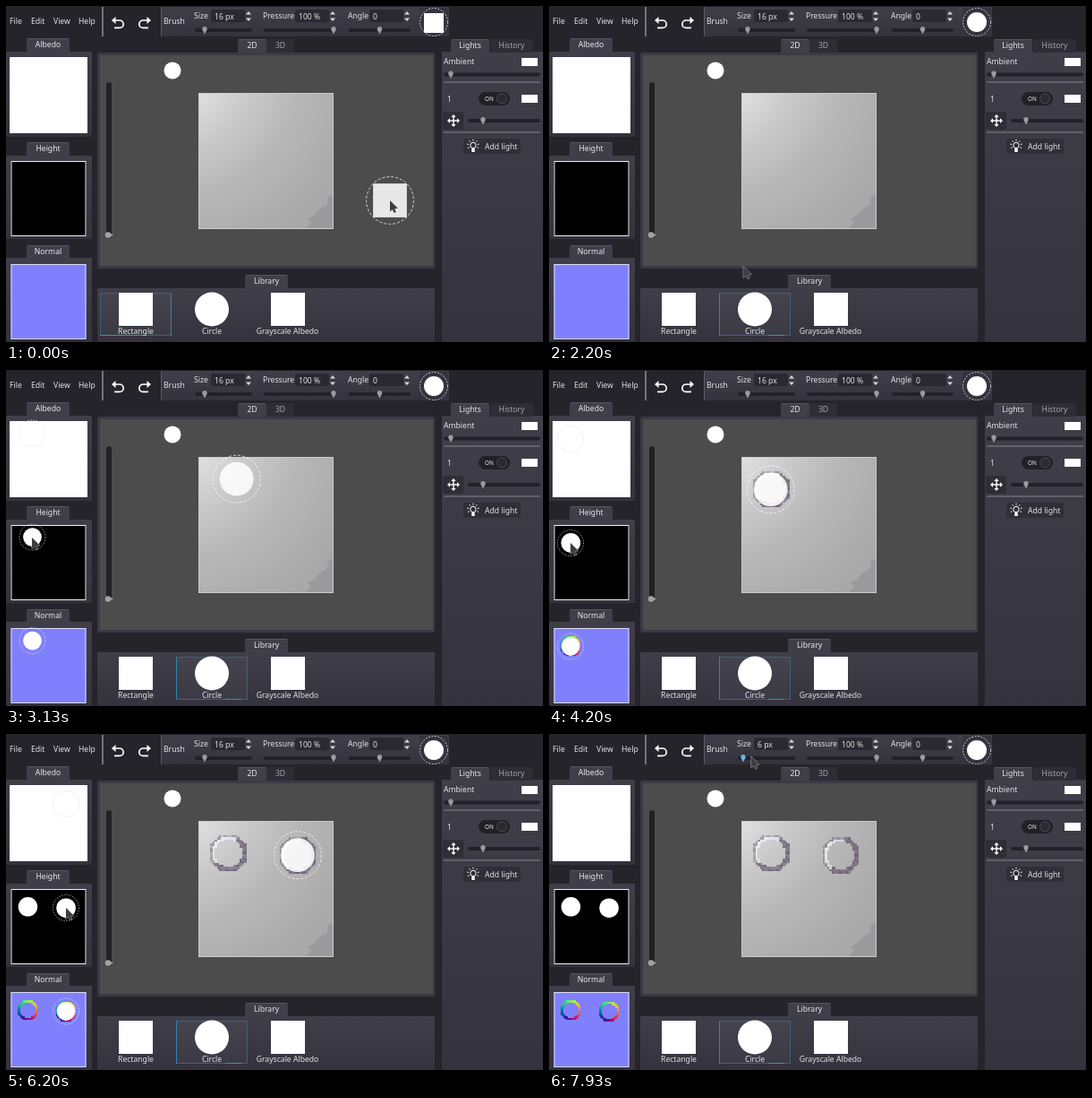
Animation, 600 px wide and 375 px high, one loop 8000 ms. Source, as an HTML page with a canvas:

```html
<!DOCTYPE html>
<html>
<head>
<meta charset="utf-8">
<style>
html, body { margin: 0; width: 100%; height: 100%; overflow: hidden; background: #25242b; }
canvas { display: block; }
</style>
</head>
<body>
<canvas id="stage" width="600" height="375"></canvas>
<script>
const g = document.getElementById('stage').getContext('2d');
const LOOP = 8000, TICK = 1000 / 15, TEXELS = 64;
const PICK = 1500, STAMP_1 = 3850, STAMP_2 = 5930, HOVER = 7060, DRAG = 7500, DRAG_END = 7900;
const LAMP = { x: 186, y: 72 };

// cursor path: time, x, y
const path = [
  [0, 429, 217], [870, 229, 349], [1200, 221, 345], [2000, 221, 345], [2530, 209, 175],
  [2600, 165, 138], [2870, 32, 184], [3130, 29, 187], [3730, 24, 193], [4200, 24, 193],
  [4930, 59, 193], [5130, 59, 193], [5800, 67, 194], [6750, 67, 194], [7070, 229, 27],
  [7330, 231, 25], [DRAG, 231, 25], [DRAG_END, 226, 25], [LOOP, 226, 25]
];

// the four places that show the texture: origin, scale, visible area
const small = 83 / TEXELS;
const maps = [
  { kind: 'lit', x: 215, y: 97, k: 151 / TEXELS, area: [105, 55, 372, 235] },
  { kind: 'albedo', x: 6, y: 57, k: small, area: [2, 53, 92, 92] },
  { kind: 'height', x: 6, y: 173, k: small, area: [2, 169, 92, 91] },
  { kind: 'normal', x: 6, y: 288.5, k: small, area: [2, 284, 92, 91] }
];

function rect(color, x, y, w, h) {
  g.fillStyle = color;
  g.fillRect(x, y, w, h);
}
function frame(color, x, y, w, h) {
  g.strokeStyle = color;
  g.lineWidth = 1;
  g.strokeRect(x + .5, y + .5, w - 1, h - 1);
}
function round(color, x, y, w, h, r) {
  g.fillStyle = color;
  g.beginPath();
  g.roundRect(x, y, w, h, r);
  g.fill();
}
function disc(color, x, y, r) {
  g.fillStyle = color;
  g.beginPath();
  g.arc(x, y, r, 0, 7);
  g.fill();
}
function ring(color, x, y, r, dash) {
  g.strokeStyle = color;
  g.lineWidth = 1;
  g.setLineDash(dash);
  g.beginPath();
  g.arc(x, y, r, 0, 2 * Math.PI);
  g.stroke();
  g.setLineDash([]);
}
function poly(color, ...p) {
  g.fillStyle = color;
  g.beginPath();
  for (let i = 0; i < p.length; i += 2) g.lineTo(p[i], p[i + 1]);
  g.closePath();
  g.fill();
}
function text(s, x, middle, align = 'left', color = '#e2e2e4', size = 8.6) {
  g.font = size + 'px "Noto Sans", "Open Sans", sans-serif';
  g.textAlign = align;
  g.fillStyle = color;
  g.fillText(s, x, middle + size * .36);
}
function panel(x, y, w, h) {
  const fill = g.createLinearGradient(0, y, 0, y + h);
  fill.addColorStop(0, '#403e49');
  fill.addColorStop(1, '#34323c');
  round(fill, x, y, w, h, 1);
}
function tab(label, x, y, w, active = true) {
  round(active ? '#403e49' : '#2e2c35', x, y, w, 15, [2, 2, 0, 0]);
  if (active) rect('#56545f', x + 1, y, w - 2, 1);
  text(label, x + w / 2, y + 7, 'center', active ? '#e8e8ea' : '#a5a4aa');
}
function slider(x0, x1, y, knob, color = '#9b9aa2') {
  round('#222028', x0, y - 2, x1 - x0, 4, 2);
  disc(color, knob, y - 1.2, 2.7);
  poly(color, knob - 2.3, y, knob + 2.3, y, knob, y + 4.5);
}
function spinBox(label, x, value, boxX) {
  text(label, x, 11);
  round('#2a2831', boxX, 4, 38, 14, 2);
  text(value, boxX + 4, 11.5);
  const a = boxX + 42;
  poly('#d8d8da', a - 3, 9.5, a, 6, a + 3, 9.5);
  poly('#d8d8da', a - 3, 13.5, a, 17, a + 3, 13.5);
}
function historyArrow(x, dir) {
  g.save();
  g.translate(x, 19);
  g.scale(dir, 1);
  g.strokeStyle = '#fff';
  g.lineWidth = 1.7;
  g.beginPath();
  g.moveTo(-4, -3);
  g.lineTo(2, -3);
  g.arc(2, 1.2, 4.2, -Math.PI / 2, Math.PI / 2);
  g.lineTo(-4, 5.4);
  g.stroke();
  poly('#fff', -7, -3, -2.5, -7, -2.5, 1);
  g.restore();
}
function moveIcon(x, y) {
  rect('#fff', x - 5, y - .7, 10, 1.4);
  rect('#fff', x - .7, y - 5, 1.4, 10);
  for (const [a, b] of [[1, 0], [-1, 0], [0, 1], [0, -1]])
    poly('#fff', x + a * 7, y + b * 7, x + a * 4 + b * 2.7, y + b * 4 + a * 2.7,
      x + a * 4 - b * 2.7, y + b * 4 - a * 2.7);
}
function bulbIcon(x, y) {
  ring('#fff', x, y - 1, 3.2, []);
  rect('#fff', x - 1.7, y + 2.5, 3.4, 4);
  g.beginPath();
  for (let i = 0; i < 7; i++) {
    const a = Math.PI * (1 - .15 + i * 1.3 / 6), c = Math.cos(a), s = Math.sin(a);
    g.moveTo(x + c * 5, y - 1 + s * 5);
    g.lineTo(x + c * 6.8, y - 1 + s * 6.8);
  }
  g.stroke();
}

function cursorAt(t) {
  const i = Math.max(1, path.findIndex(p => p[0] > t));
  const [t0, x0, y0] = path[i - 1], [t1, x1, y1] = path[i];
  const f = Math.min(1, Math.max(0, (t - t0) / (t1 - t0))), e = f * f * (3 - 2 * f);
  return { x: x0 + (x1 - x0) * e, y: y0 + (y1 - y0) * e };
}
const inside = (p, [x, y, w, h]) => p.x >= x && p.x <= x + w && p.y >= y && p.y <= y + h;

function texelColor(kind, i, j, lampX, lampY) {
  const d = Math.hypot(i, j);
  if (d < 6.5 || d > 8.95) return null;
  const nx = i / d, ny = j / d;
  if (kind === 'normal')
    return `rgb(${128 + 125 * nx}, ${125 - 115 * ny}, ${112 - 45 * nx + 20 * ny})`;
  const noise = Math.abs(Math.sin(i * 12.9 + j * 78.2) * 43758) % 1;
  const light = nx * lampX + ny * lampY;
  if (light < .2) return `rgba(100, 88, 112, ${.9 - .35 * noise})`;
  return d < 8 ? `rgba(242, 242, 242, ${.35 + .45 * light})`
    : `rgba(100, 88, 112, ${.15 + .4 * noise})`;
}
function drawStamp(m, u, v) {
  const cx = m.x + u * m.k, cy = m.y + v * m.k;
  if (m.kind === 'albedo') return;
  if (m.kind === 'height') return disc('#fff', cx, cy, 8.3 * m.k);
  const lx = LAMP.x - cx, ly = LAMP.y - cy, len = Math.hypot(lx, ly);
  // cells end on whole pixels so that no seams show
  const edge = (c, i) => Math.round(c + (i - .5) * m.k);
  for (let j = -9; j <= 9; j++)
    for (let i = -9; i <= 9; i++) {
      const color = texelColor(m.kind, i, j, lx / len, ly / len);
      const x = edge(cx, i), y = edge(cy, j);
      if (color) rect(color, x, y, edge(cx, i + 1) - x, edge(cy, j + 1) - y);
    }
}
function drawBrush(m, u, v, isCircle) {
  const x = m.x + u * m.k, y = m.y + v * m.k, r = 8 * m.k, big = m.kind === 'lit';
  const fill = big ? 'rgba(255,255,255,.87)' : '#fff';
  if (isCircle) disc(fill, x, y, r);
  else rect(fill, x - r, y - r, 2 * r, 2 * r);
  ring(m.kind === 'albedo' ? '#e4e4e4' : big ? 'rgba(255,255,255,.75)' : 'rgba(255,255,255,.6)',
    x, y, 11.2 * m.k, big ? [3, 2] : [1.5, 1.5]);
}

function drawToolbar(t, isCircle) {
  ['File', 'Edit', 'View', 'Help'].forEach((s, i) => text(s, [4, 28, 53, 81][i], 17));
  rect('#c4c4c8', 107.5, 1, 1, 33);
  historyArrow(125, 1);
  historyArrow(155, -1);
  panel(173, 1, 322, 33);
  rect('#5d5b66', 173, 1, 1, 33);
  text('Brush', 176, 17);
  const dragged = Math.min(1, Math.max(0, (t - DRAG) / (DRAG_END - DRAG)));
  spinBox('Size', 210, Math.round(16 - 10 * dragged) + ' px', 229);
  spinBox('Pressure', 287, '100 %', 323);
  spinBox('Angle', 382, '0', 406);
  slider(211, 275, 27, 222 - 5 * dragged, t > HOVER ? '#6fb4dc' : undefined);
  slider(288, 368, 27, 366);
  slider(383, 452, 27, 417.5);
  round('#35333d', 462, 2, 32, 32, 2);
  if (isCircle) disc('#fff', 478, 18, 11);
  else rect('#fff', 467, 8, 22, 22);
  ring('#c8c8cc', 478, 18, 15.5, [2, 1.5]);
}

function drawLights() {
  panel(487, 51, 113, 324);
  tab('Lights', 497, 37, 43);
  tab('History', 541, 37, 48, false);
  text('Ambient', 489, 62);
  rect('#fff', 576, 58, 18, 9);
  slider(489, 597, 76.5, 497);
  rect('#85838d', 489, 84.5, 108, 1);
  text('1', 493, 103.5);
  round('#222027', 528, 96, 35, 15, 7.5);
  text('ON', 535, 103.5, 'left', '#f0f0f0', 6.3);
  disc('#2b2a31', 554, 103.5, 6);
  ring('#4a4850', 554, 103.5, 5.5, []);
  rect('#fff', 576, 99, 18, 9);
  round('#2f2d36', 488, 118, 23, 20, 2);
  moveIcon(500, 128);
  slider(516, 597, 128, 533);
  rect('#85838d', 489, 140.5, 108, 1);
  round('#302e37', 511, 148, 64, 17, 2);
  bulbIcon(522, 156.5);
  text('Add light', 535, 156.5);
}

function drawLibrary(isCircle, hoverCircle) {
  panel(102, 315, 377, 60);
  tab('Library', 267, 300, 48);
  const x = isCircle ? 190 : 105;
  rect('rgba(255,255,255,.03)', x, 320, 80, 48);
  frame('#3a6478', x, 320, 80, 48);
  rect('#2e86b0', isCircle ? x : x + 79, 320, 1, 48);
  rect('#2f9d86', isCircle ? x + 55 : x, 367, isCircle ? 18 : 50, 1);
  if (isCircle) rect('#6c4aa8', x + 8, 367, 30, 1);
  if (!isCircle && hoverCircle) {
    rect('#403f46', 190, 320, 80, 48);
    frame('#504f58', 190, 320, 80, 48);
  }
  rect('#fff', 126, 320, 38, 37);
  disc('#fff', 230, 338.5, 19);
  rect('#fff', 296, 320, 38, 37);
  text('Rectangle', 145, 363, 'center');
  text('Circle', 230, 363, 'center');
  text('Grayscale Albedo', 314.5, 363, 'center');
}

function drawViewport() {
  round('#3b3944', 102, 52, 377, 241, 2);
  tab('2D', 259, 37, 32);
  tab('3D', 291, 37, 31, false);
  rect('#4c4c4c', 105, 55, 372, 235);
  round('#222027', 112, 85, 6, 173, 3);
  disc('#a3a2a6', 114, 255.5, 3.2);
  poly('#a3a2a6', 115, 253, 120, 255.5, 115, 258);
  const glow = g.createRadialGradient(LAMP.x, LAMP.y, 30, LAMP.x, LAMP.y, 255);
  ['#e4e4e4', '#cacaca', '#b7b7b7', '#acacac', '#a5a5a5']
    .forEach((color, i) => glow.addColorStop(i / 4, color));
  rect(glow, 215, 97, 151, 152);
  poly('#9b9b9f', 366, 210, 360, 213, 359, 221, 350, 227, 344, 234, 336, 238,
    341, 241, 335, 249, 366, 249);
  frame('#cbcbcb', 215, 97, 151, 152);
  disc('#fff', LAMP.x, LAMP.y, 9.5);
}

function drawTexturePanels() {
  [['Albedo', 36, 51, 95], ['Height', 152, 167, 93], ['Normal', 267, 281, 94]]
    .forEach(([name, y, top, h]) => {
      panel(0, top, 96, h);
      tab(name, 23, y, 48);
    });
  rect('#fff', 4, 57, 87, 85);
  rect('#000', 5.5, 173, 84, 84);
  frame('#f0f0f0', 5.5, 173, 84, 84);
  rect('#8080ff', 5.5, 288, 84, 84);
  frame('#dcdcf4', 5.5, 288, 84, 84);
}

function drawPointer({ x, y }) {
  g.beginPath();
  [[0, 0], [0, 12.5], [2.7, 10.3], [4.8, 14], [6.8, 13], [5.3, 9.4], [8.8, 8.8]]
    .forEach(([a, b]) => g.lineTo(x + a, y + b));
  g.closePath();
  g.fillStyle = '#3e3e42';
  g.strokeStyle = 'rgba(235,235,235,.7)';
  g.lineWidth = 1;
  g.stroke();
  g.fill();
}

function draw(t) {
  const isCircle = t >= PICK, cursor = cursorAt(t);
  const brush = cursorAt(Math.max(0, t - TICK)); // preview trails the pointer by one tick
  const hovered = maps.find(m => inside(brush, m.area));

  rect('#25242b', 0, 0, 600, 375);
  drawToolbar(t, isCircle);
  drawTexturePanels();
  drawViewport();
  drawLights();
  drawLibrary(isCircle, inside(cursor, [190, 320, 80, 48]));

  for (const m of maps) {
    g.save();
    g.beginPath();
    g.rect(...m.area);
    g.clip();
    if (t >= STAMP_1) drawStamp(m, 14.2, 15.3);
    if (t >= STAMP_2) drawStamp(m, 47.1, 16.3);
    if (hovered)
      drawBrush(m, (brush.x - hovered.x) / hovered.k, (brush.y - hovered.y) / hovered.k, isCircle);
    g.restore();
  }
  drawPointer(cursor);
}

function tick() {
  const t = performance.now() % LOOP;
  draw(Math.floor((t + 5) / TICK) * TICK);
  requestAnimationFrame(tick);
}
tick();
</script>
</body>
</html>
```
